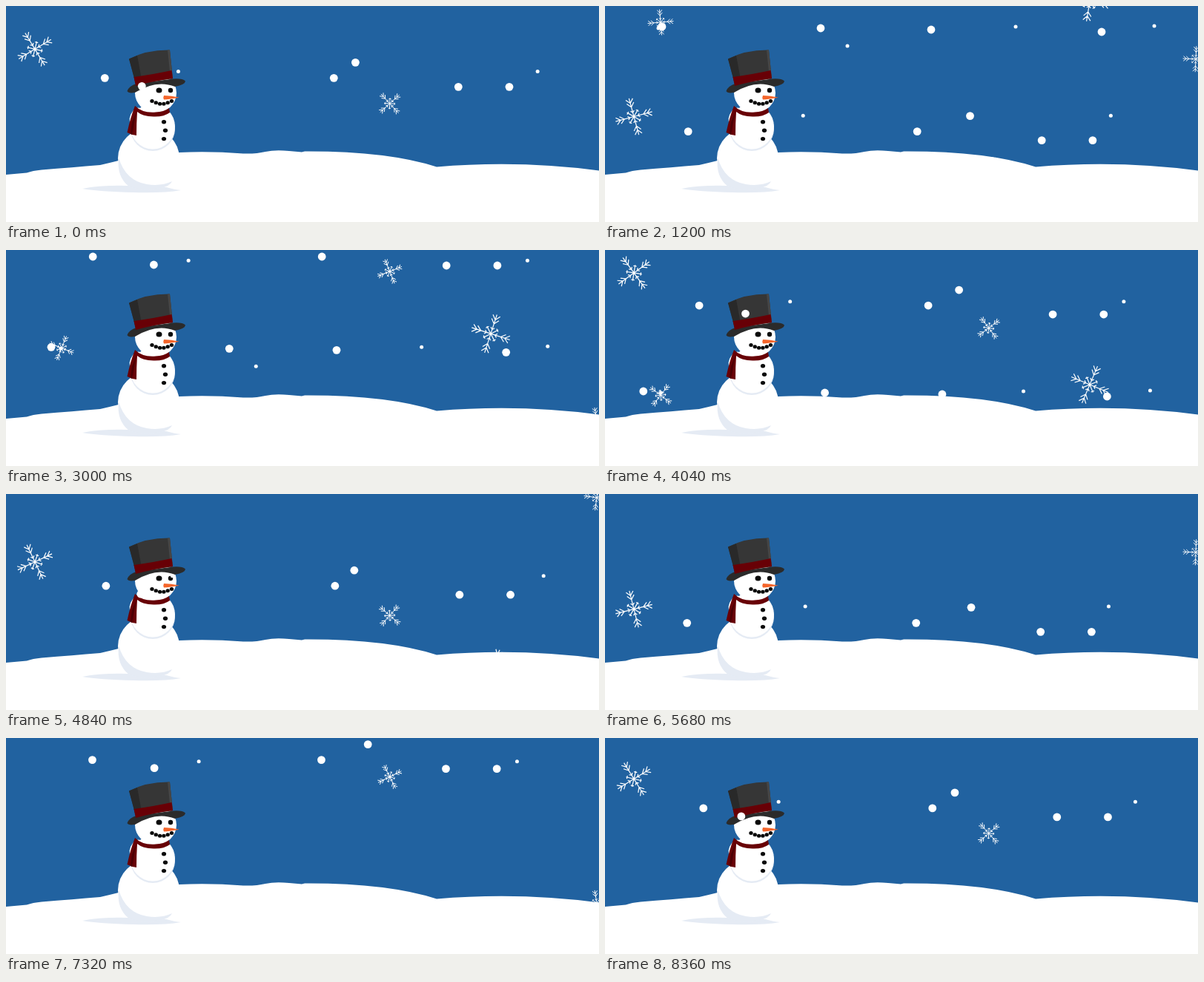
Write an HTML page with a canvas that moves like this. It is 800 by 292 pixels and loops after 8400 ms.

```html
<!DOCTYPE html>
<html lang="en">
<head>
<meta charset="utf-8">
<title>Snowman in falling snow</title>
<style>
html, body { margin: 0; width: 100%; height: 100%; overflow: hidden; background: #2162a0; }
canvas { display: block; width: 800px; height: 292px; }
</style>
</head>
<body>
<canvas id="stage" width="800" height="292"></canvas>
<script>
const ctx = document.getElementById('stage').getContext('2d');
const LOOP = 8400, STEP = 40;
const BIG = 5.4, SMALL = 2.5;

function shape(color, path) {
  ctx.fillStyle = color;
  ctx.fill(new Path2D(path));
}

function oval(color, x, y, rx, ry = rx, turn = 0) {
  ctx.fillStyle = color;
  ctx.beginPath();
  ctx.ellipse(x, y, rx, ry, turn, 0, 2 * Math.PI);
  ctx.fill();
}

const dot = (x, y, r) => oval('#fff', x, y, r);

function flake(x, y, size, degrees) {
  ctx.save();
  ctx.translate(x, y);
  ctx.rotate(degrees * Math.PI / 180);
  ctx.strokeStyle = '#fff';
  ctx.lineWidth = size > 20 ? 1.2 : 0.9;
  ctx.beginPath();
  const line = (a, b, c, d) => {
    ctx.moveTo(a * size, b * size);
    ctx.lineTo(c * size, d * size);
  };
  for (let arm = 0; arm < 4; arm++) {
    line(0, 0, 1, 0);
    line(0, 0, 0.3, 0.3);
    line(0.2, 0.32, 0.32, 0.2);
    for (const side of [-1, 1]) {
      line(0.73, 0, 0.95, 0.19 * side);
      line(0.52, 0, 0.74, 0.19 * side);
      line(0.22, 0, 0.32, 0.1 * side);
    }
    ctx.rotate(Math.PI / 2);
  }
  ctx.stroke();
  ctx.restore();
}

// Sideways swing: eases between turning points [seconds, x].
function swing(turns, s) {
  let i = 0;
  while (i < turns.length - 2 && s > turns[i + 1][0]) i++;
  const [t0, x0] = turns[i], [t1, x1] = turns[i + 1];
  const k = Math.min(1, Math.max(0, (s - t0) / (t1 - t0)));
  return x0 + (x1 - x0) * (1 - Math.cos(Math.PI * k)) / 2;
}

const BIG_SWING = [[-0.4, 121], [0.4, 116.3], [1.9, 135.5], [3, 109.5], [4, 122]];
const SMALL_SWING = [[-0.1, 240], [0.7, 264], [1.95, 224], [2.98, 272], [4, 236]];
const LEAN = [[0, 0], [2, 10.5], [3.4, 3]];

function firstShower(s) {
  const x = swing(BIG_SWING, s), y = -2 + 65 * s - 1.1 * s * s;
  dot(x, y, BIG);
  dot(x + 309, y, BIG);
  dot(x + 477, y + 12, BIG);
  dot(x + 545.7, y + 12, BIG);
  dot(316.6 - x, y + 11, BIG);
  dot(604.7 - x, y - 21, BIG);

  const sx = swing(SMALL_SWING, s), sy = 5 + 55 * s - 1.2 * s * s;
  dot(sx, sy, SMALL);
  dot(949.6 - sx, sy, SMALL);

  flake(39, 76 * s - 61, 25.5, 13.3 * s - 52);
  flake(517.7, 73.5 * s + 16.5, 17.5, -14.5 * s - 19.5);
  flake(797, 88 * s - 172, 17.5, 22 - 7 * s);
}

function secondShower(s) {
  const lean = swing(LEAN, s), drift = 3.7 * s, y = 30 + 57.4 * s;
  dot(291 + lean, y, BIG);
  dot(327 + lean, y + 24, SMALL);
  dot(741 - lean, y - 3, SMALL);
  dot(77 - 2.4 * drift, y - 2, BIG);
  dot(72 + 0.3 * drift, y, SMALL);
  dot(440 + 0.5 * drift * s, y + 2, BIG);
  dot(554 + drift, y - 2, SMALL);
  dot(670 + 0.7 * drift, y + 5, BIG);

  flake(654, -6 + 66.2 * s, 27, 9.5 + 4.7 * s);
  flake(75, 22 + 61.4 * s, 17.5, -5 + 15 * s);
}

function hill() {
  shape('#fff', `M0 228 L28 225.5 Q36 222.5 48 221.5 Q90 218 127 215 Q140 212 156 208
    L234 198 Q275 196 320 199.5 Q338 200 350 197 Q363 194 382 196 L399 197.5 L403 196.5
    Q515 196 581 217.5 Q692 208 800 222.5 V292 H0Z`);
}

function snowman() {
  const shade = '#e5ebf4', red = '#680006', black = '#0a0a0a';

  shape(shade, 'M103 247 Q128 242 165 243 L216 245 Q226 248 236 249 Q214 253 172 252 Q126 251 103 247Z');
  oval('#fff', 192.5, 206, 41.5, 41);
  shape(shade, 'M152 205 Q149 231 166 244 Q184 250 208 246 Q221 244 224 237 Q209 244 190 241 Q161 236 152 205Z');

  oval(shade, 198, 166, 30, 30);
  oval('#fff', 198, 163, 30, 30.5);
  oval('#fff', 176, 150, 8.5, 13, 0.4);
  oval('#fff', 202, 117.5, 28, 27);

  // scarf
  shape(red, 'M174 135 Q184 145 202 143.5 Q213 143 220 138 L221 144 Q213 150 199 149.5 Q184 149 177 143 Q176 158 176 175 Q169 174 163.5 171 Q168 150 174 135Z');
  shape('#4c0004', 'M176 143 L170 157 L168 173 L170 174 L173 158Z');

  // hat
  shape('#2b2b2b', 'M163.5 115 Q166 108 176 105 L225 98.5 Q238 97.5 242 101.5 Q242 106 228 109 Q203 99 174 117 Q165 118.5 163.5 115Z');
  shape('#363636', 'M166 71.5 Q190 59 221 59.5 L225 98 Q201 101 175.5 107Z');
  shape('#292929', 'M166 71.5 L177 67 L184 105 L175.5 107Z');
  shape('#464646', 'M218 59.5 L221 59.5 L225 98 L222 99Z');
  shape(red, 'M172.5 96 Q201 92 223.5 87 L225 98 Q200 101 175 108Z');

  // face
  oval(black, 206.5, 114, 4, 3.5);
  oval(black, 222, 114, 3.2);
  shape('#f4652a', 'M213 121 Q223 121 234 123.7 Q222 126 213 126.5 Q211.5 124 213 121Z');
  for (let i = 0; i < 6; i++) {
    oval(black, 197 + 5.3 * i, 128.4 + 4.1 * Math.sin(Math.PI * i / 5), 2.7, 2.5);
  }

  for (let i = 0; i < 3; i++) oval(black, 213 + 2 * (i % 2), 156.8 + 11.4 * i, 3.1, 2.7);
}

// Runs a shower whose clock is zero at "start"; "lead" is how much earlier it appears.
function play(shower, t, start, lead) {
  const ms = (t - start + lead + LOOP) % LOOP - lead;
  if (ms < 4800) shower(ms / 1000);
}

function draw() {
  const now = performance.now() % LOOP;
  const t = now - now % STEP;
  ctx.fillStyle = '#2162a0';
  ctx.fillRect(0, 0, 800, 292);
  hill();
  snowman();
  play(firstShower, t, 2830, 400);
  play(firstShower, t, 6830, 400);
  play(secondShower, t, 1200, 1200);
  requestAnimationFrame(draw);
}
draw();
</script>
</body>
</html>
```
